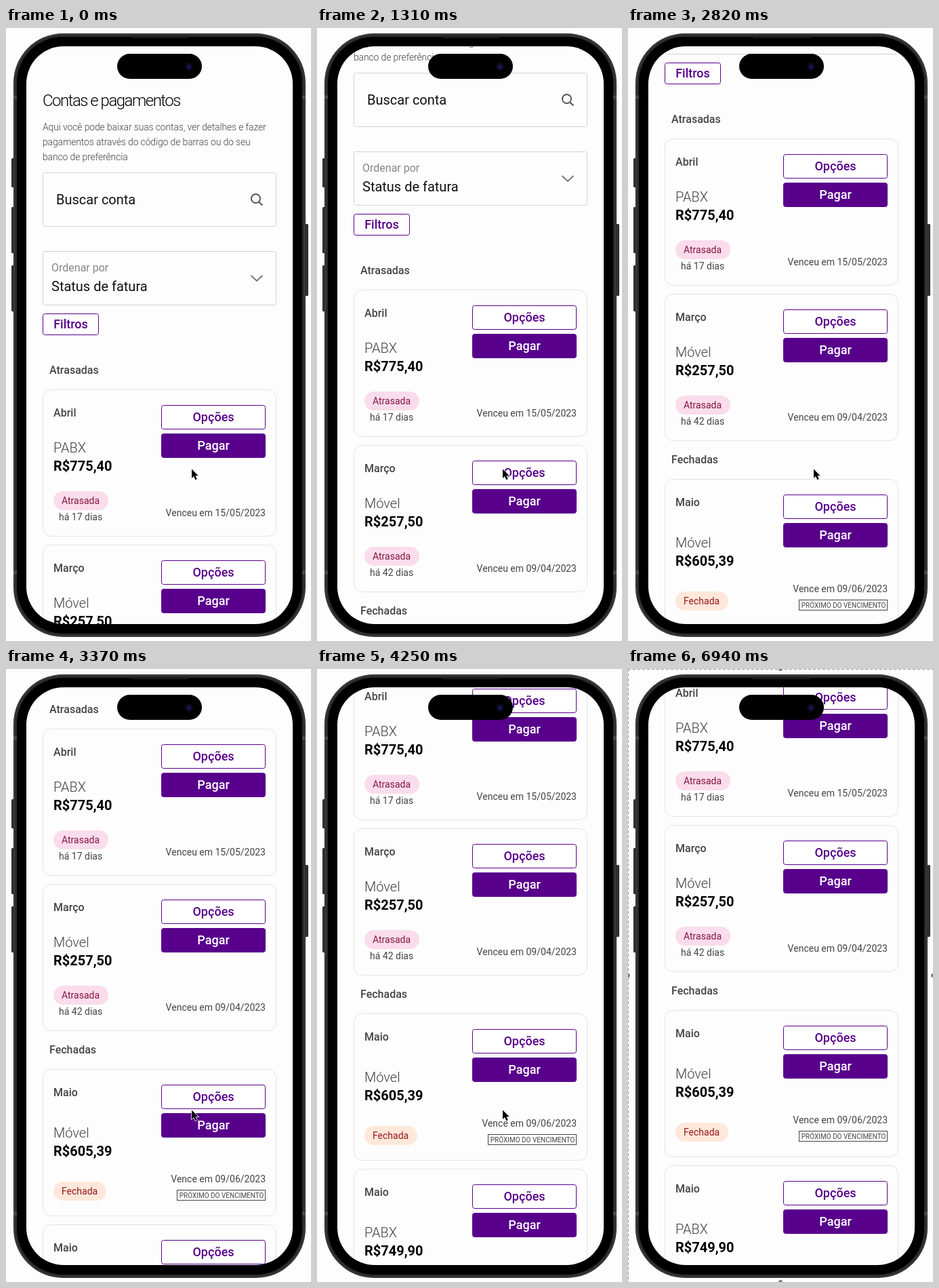
Recreate the animation shown at these times as an HTML page. Size 450 by 904 pixels, loop 6970 ms.

```html
<!DOCTYPE html>
<html lang="pt-BR">
<head>
<meta charset="utf-8">
<title>Contas e pagamentos</title>
<style>
  html, body { margin: 0; width: 100%; height: 100%; overflow: hidden; background: #fdfdfd; }
  svg { display: block; font-family: Roboto, sans-serif; }
</style>
</head>
<body>
<svg id="stage" width="450" height="904" viewBox="0 0 450 904">
  <defs>
    <clipPath id="screen"><rect x="30" y="27" width="393" height="852" rx="55"/></clipPath>
  </defs>
  <g id="sideButtons" fill="#303030">
    <rect x="8" y="192" width="5" height="43" rx="1.5"/>
    <rect x="8" y="264" width="5" height="68" rx="1.5"/>
    <rect x="8" y="350" width="5" height="68" rx="1.5"/>
    <rect x="440" y="289" width="6" height="106" rx="1.5"/>
  </g>
  <rect x="11" y="8" width="431" height="890" rx="73" fill="#2b2b2b"/>
  <rect x="12.5" y="9.5" width="428" height="887" rx="71.5" fill="none" stroke="#444"/>
  <path d="M11 102h5M11 803h5M437 102h5M437 803h5" stroke="#4c4c4c" stroke-width="5"/>
  <rect x="16" y="13" width="421" height="880" rx="68"/>
  <rect x="184" y="12" width="86" height="3" rx="1.5" fill="#1b1b1b"/>
  <rect x="30" y="27" width="393" height="852" rx="55" fill="#fdfdfd"/>
  <g clip-path="url(#screen)"><g id="page"></g></g>
  <rect x="164" y="38" width="125" height="37" rx="18.5"/>
  <circle cx="270" cy="57" r="6" fill="#0a0a20"/>
  <circle cx="270" cy="57" r="2.5" fill="#1c1c55"/>
  <g id="selection" fill="#808080">
    <path d="M0 .5H450M.5 0V904" fill="none" stroke="#999" stroke-dasharray="4 3"/>
    <circle cx="225" cy="0" r="3"/><circle cx="225" cy="904" r="3"/>
    <circle cx="0" cy="452" r="3"/><circle cx="450" cy="452" r="3"/>
  </g>
  <path id="cursor" d="M0 0V13.4L3 10.6 5.3 15.8 7.7 14.7 5.5 9.7H9.7Z" stroke="#fff" stroke-width="1.4" paint-order="stroke"/>
</svg>
<script>
const PURPLE = '#58008c', LOOP = 6970;
const $ = id => document.getElementById(id);

// Text whose line is vertically centred on y
const text = (x, y, size, weight, fill, str, more = '') =>
  `<text x="${x}" y="${Math.round(y + size * .35)}" font-size="${size}" font-weight="${weight}" fill="${fill}" ${more}>${str}</text>`;

const box = (x, y, w, h, r, stroke, fill = 'none') =>
  `<rect x="${x + .5}" y="${y + .5}" width="${w - 1}" height="${h - 1}" rx="${r}" stroke="${stroke}" fill="${fill}"/>`;

const button = (x, y, w, h, label, filled) =>
  box(x, y, w, h, 3, PURPLE, filled ? PURPLE : '#fff') +
  text(x + w / 2, y + h / 2, 18, 500, filled ? '#fff' : PURPLE, label, 'text-anchor="middle"');

const chip = (y, w, bg, fill, label) =>
  `<rect x="70" y="${y}" width="${w}" height="28" rx="14" fill="${bg}"/>` +
  text(82, y + 14, 14, 400, fill, label);

function card(y, month, kind, price, due, late) {
  const shift = late ? 0 : 8, end = 'text-anchor="end"';
  return box(54, y, 345, 217, 12, '#e3e3e3') +
    text(70, y + 34.5, 16, 500, '#444', month) +
    button(229, y + 23, 154, 36, 'Opções') +
    button(229, y + 65, 154, 36, 'Pagar', true) +
    text(70, y + 85.5 + shift, 20, 300, '#444', kind) +
    text(70, y + 112.5 + shift, 20, 700, '#000', price) +
    (late
      ? chip(y + 150, 81, '#fadcec', '#86163f', 'Atrasada') +
        text(78, y + 188, 14, 400, '#444', late) +
        text(383, y + 182, 14, 400, '#444', 'Venceu em ' + due, end)
      : chip(y + 166, 78, '#ffe8da', '#96151c', 'Fechada') +
        text(383, y + 162, 14, 400, '#444', 'Vence em ' + due, end) +
        box(252, y + 178, 131, 16, 0, '#444') +
        text(380.5, y + 186, 10, 400, '#444', 'PRÓXIMO DO VENCIMENTO', end));
}

const intro = [
  'Aqui você pode baixar suas contas, ver detalhes e fazer',
  'pagamentos através do código de barras ou do seu',
  'banco de preferência'
];

$('page').innerHTML =
  text(54, 107, 24, 300, '#000', 'Contas e pagamentos', 'letter-spacing="-1.5"') +
  intro.map((line, i) => text(54, 146 + 22 * i, 14, 300, '#444', line, 'letter-spacing="-.15"')).join('') +
  box(54, 213, 345, 80, 3, '#d2d2d2') +
  text(74, 253, 20, 400, '#111', 'Buscar conta') +
  '<path d="M373 256.500L378.500 261.500" stroke="#555" stroke-width="2.200"/>' +
  '<circle cx="368.500" cy="251.500" r="6.500" fill="none" stroke="#555" stroke-width="2"/>' +
  box(54, 329, 345, 80, 3, '#d2d2d2') +
  text(67, 353.5, 16, 400, '#858585', 'Ordenar por') +
  text(67, 381, 20, 400, '#111', 'Status de fatura') +
  '<path d="M361.500 365l8.500 8 8.500-8" fill="none" stroke="#777" stroke-width="2"/>' +
  button(54, 421, 83, 32, 'Filtros') +
  text(64, 504.5, 16, 500, '#444', 'Atrasadas') +
  card(533, 'Abril', 'PABX', 'R$775,40', '15/05/2023', 'há 17 dias') +
  card(762, 'Março', 'Móvel', 'R$257,50', '09/04/2023', 'há 42 dias') +
  text(64, 1006.5, 16, 500, '#444', 'Fechadas') +
  card(1035, 'Maio', 'Móvel', 'R$605,39', '09/06/2023') +
  card(1264, 'Maio', 'PABX', 'R$749,90', '09/06/2023');

// Scroll keys: time, offset, speed in px/ms
const keys = [
  [240, 0, .08], [1310, 147, .13], [2310, 273, .155],
  [2820, 370, .155], [3670, 477, .1], [4460, 532, 0]
];

function scrollAt(t) {
  if (t <= keys[0][0]) return 0;
  const i = keys.findIndex(k => k[0] >= t);
  if (i < 0) return keys.at(-1)[1];
  const [t0, y0, v0] = keys[i - 1], [t1, y1, v1] = keys[i];
  const d = t1 - t0, u = (t - t0) / d, s = u * u * (3 - 2 * u);
  return y0 + (y1 - y0) * s + d * u * (1 - u) * (v0 * (1 - u) - v1 * u);
}

function draw(now) {
  const t = now % LOOP;
  const u = Math.min(1, Math.max(0, (t - 5900) / 600)), leave = u * u * (3 - 2 * u);
  $('page').setAttribute('transform', `translate(0 ${-Math.round(scrollAt(t))})`);
  $('cursor').setAttribute('transform', `translate(${274 + 126 * leave} ${650.5 + 258 * leave})`);
  $('selection').setAttribute('visibility', t < 5700 ? 'hidden' : 'visible');
  requestAnimationFrame(draw);
}
draw(0);
</script>
</body>
</html>
```
